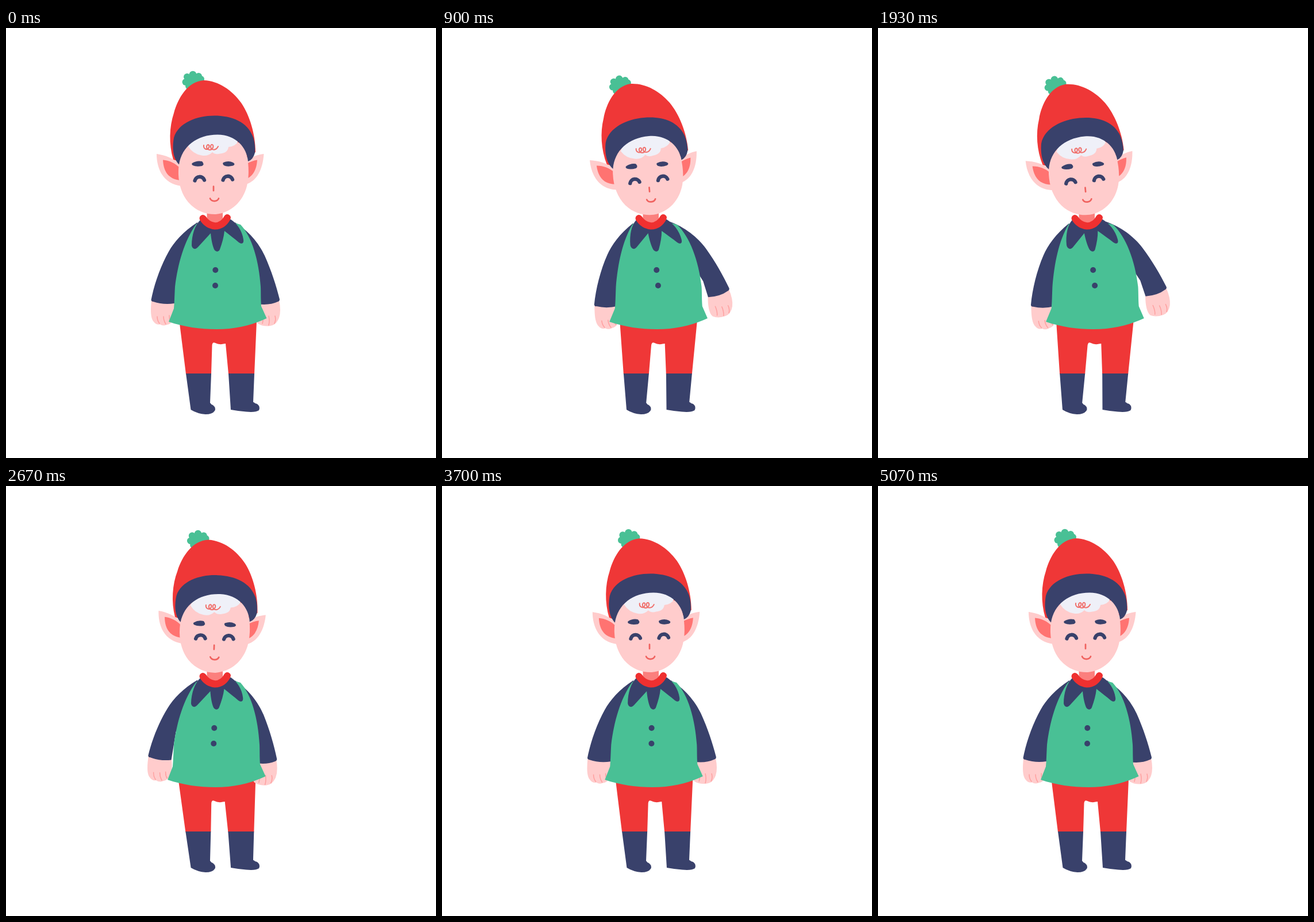
Recreate the animation shown at these times as an HTML page. Size 748 px wide and 748 px high, loop 5110 ms.

```html
<!DOCTYPE html>
<html lang="en">
<head>
<meta charset="utf-8">
<title>Dancing elf</title>
<style>
  html, body { margin: 0; width: 100%; height: 100%; overflow: hidden; background: #fff; }
  svg { display: block; width: 100%; height: 100%; }
  .red { fill: #ef3737; }
  .navy { fill: #39416b; }
  .green { fill: #49c095; }
  .skin { fill: #ffcccc; }
  .pink { fill: #ff7371; }
  .white { fill: #eff0f8; }
  .line { fill: none; stroke-linecap: round; stroke-linejoin: round; }
  .finger { stroke: #ff9f9f; stroke-width: 1.5; }
  .eye { stroke: #39416b; stroke-width: 6.3; }
  .mark { stroke: #f0625f; stroke-width: 2.7; }
  .curl { stroke: #f0706c; stroke-width: 2; }
  .ruff { stroke: #ef3030; stroke-width: 12; }
</style>
</head>
<body>
<svg viewBox="0 0 748 748">
  <g id="legs">
    <path class="red" d="M301.500 510L313 602H357L358.500 552Q359 546 363 547.500Q371 551.500 378 549.500L382 549L387 602H432L436 510Z"/>
    <path class="navy" d="M313 601H357L355 652Q357 655 360 656Q366 661 363 666Q359 672 347 672Q333 671 321.500 664Z"/>
    <path class="navy" d="M387 601H432L430 650.500Q433 653 437 654Q443 659 440 665Q434 669 418 667.500Q403 666 391 664Z"/>
  </g>

  <g id="armL">
    <path class="skin" d="M253 474C251.500 489 251 505 257 511Q261 517 268 515.500Q273 519 279 516.500Q288 515 291 507Q297 495 293 477Z"/>
    <path class="line finger" d="M263 502Q263 509 267 514M274 502Q274 509 278 515M284 500Q284 507 287 511"/>
    <path class="navy" d="M333 338C308 354 292 373 283 389C269 414 258 445 252.500 473Q253 476 256 476Q274 482 293 479L299 430L333 365Z"/>
  </g>

  <g id="armR">
    <path class="skin" d="M437 478L475 473Q479 492 475 504Q470 517 460 518Q447 520 438 514Q431 505 437 478Z"/>
    <path class="line finger" d="M446 498Q448 508 446 514M457 501Q459 509 457 517M468 501Q470 508 467 514"/>
    <path class="navy" d="M398 338C421 352 440 374 450 396C462 423 470 448 476 472Q476 475 473 476Q458 483 437 480L434 451L405 375Z"/>
  </g>

  <path class="green" id="tunic"/>
  <circle class="navy" id="buttonA" cy="421" r="5"/>
  <circle class="navy" id="buttonB" cy="448" r="5"/>
  <path fill="#fb7f7d" d="M349.500 318H377V338Q363 345 349.500 336Z"/>
  <path class="navy" id="collar"/>
  <path class="line ruff" d="M342.500 331Q350 343 363.500 344.500Q378 344 385 330"/>

  <g id="head">
    <g class="green">
      <circle cx="325" cy="93" r="13"/>
      <circle cx="315" cy="85" r="6"/>
      <circle cx="325" cy="81" r="6.300"/>
      <circle cx="335" cy="84" r="6"/>
      <circle cx="339" cy="89" r="6"/>
      <circle cx="312.500" cy="94" r="6"/>
      <circle cx="318" cy="101" r="6"/>
    </g>
    <path class="red" d="M291 229C283 202 284 172 292 148C299 122 316 93 344 91C370 92 393 108 409 130C424 152 434 185 434 216L420 225L300 232Z"/>
    <path class="skin" d="M304 239C292 226 276 221 262 219C262 244 273 272 306 275ZM417 233C426 223 440 220 448.500 219C447 243 438 266 417 272Z"/>
    <path class="pink" d="M304 245C295 235 283 230 273 229.500C274 248 281 263 304 265ZM417 237Q427 231 437 229.500C436 246 430 258 417 263Z"/>
    <path class="skin" d="M303 225C296 255 301 284 317 303C331 319 349 324.500 365 324C392 321 412 302 419 275C425 250 421 222 413 200L320 190Z"/>
    <g id="hair">
      <path class="white" d="M317 206Q330 176 362 174Q392 174 404 197Q399 206 387 207Q386 217 373 218.500Q364 221 359 216Q351 224 340 221.500Q325 219 317 206Z"/>
      <path class="line curl" d="M344 204C343 210 350 214 353 208C355 203 350 201 349 206C349 213 357 214 360 208C362 202 356 201 356 206C356 213 365 214 369 206"/>
    </g>
    <path class="navy" d="M301 237.500C290 226 289 208 292 191C300 164 333 152.500 362 152.500C393 152.500 420 163 430 190Q434 203 433 217Q430 229 421 232C419 208 400 185.500 368 185.500C332 185.500 306 206 301 237.500Z"/>
    <path class="navy" id="brows" d="M324 235Q332 230 341 232Q346 237 341 240Q331 242 325 239Q322 237 324 235ZM378 234Q387 230 395 234Q400 237 395 239.500Q385 242 379 239Q376 236 378 234Z"/>
    <path class="line eye" d="M328.500 265.500A8.600 8.600 0 0 1 345 264.500M377.500 264.500A8.600 8.600 0 0 1 394 263.500"/>
    <path class="line mark" d="M361 275.500V283M355 296.500A8 7 0 0 0 370 296.500"/>
  </g>
</svg>

<script>
  const LOOP = 5110, STEPS = 64, SWAY = 16, TICK = 1000 / 30;

  const rest  = { lean: 0, tilt: 0, left: 0, right: 0, squash: 0 };
  const swayL = { lean: -5.5, tilt: 4.6, left: 4.7, right: 4.2, squash: 0.013 };
  const swayR = { lean: 13.5, tilt: -5.5, left: -6, right: -13, squash: 0.013 };

  // When each pose is reached within one sway, in steps.
  const keys = [[0, rest], [2, swayL], [8.6, swayR], [10, swayR], [14.5, rest], [SWAY, rest]];

  const TUNIC = "M331 341C310 370 299 410 294 450C293 468 293 478 292 488L283 511C310 520 338 524 366 524C400 524 428 517 453.500 505L444 484C443 470 443.500 460 443 450C440 405 428 363 408 342L386 336L345 336Z";
  const COLLAR = "M338 334C329 342 323 360 323 378C324 385 330 386 334 381L356 357C357 368 359 378 362 385C365 390 370 390 372 385C376 374 379 363 380 353C389 360 398 367 405 373C411 377 414 374 413 368C411 353 402 340 391 333L364 340Z";

  const set = (id, name, value) => document.getElementById(id).setAttribute(name, value);
  const ease = u => (1 - Math.cos(Math.PI * u)) / 2;

  function poseAt(step) {
    const i = keys.findIndex(([at]) => at > step);
    const [[t0, a], [t1, b]] = [keys[i - 1], keys[i]];
    const w = ease((step - t0) / (t1 - t0));
    const pose = {};
    for (const k in a) pose[k] = a[k] + (b[k] - a[k]) * w;
    return pose;
  }

  // Sideways bend of the torso: none at the neck, strongest near the waist.
  const bend = (path, lean) => path.replace(/([\d.]+) ([\d.]+)/g, (_, x, y) => {
    const u = (475 - y) / 140;
    return (+x + lean * 0.74 * (1 - u * u)).toFixed(2) + " " + y;
  });

  function draw(step) {
    const { lean, tilt, left, right, squash } = poseAt(step);
    // The head nods while swinging from left to right.
    const nod = Math.max(0, Math.sin(Math.PI * step / 8)) ** 2;
    const s = squash + 0.025 * nod;
    const k = lean * 0.0045;

    set("tunic", "d", bend(TUNIC, lean));
    set("collar", "d", bend(COLLAR, lean));
    set("buttonA", "cx", 364.3 + lean * 0.75);
    set("buttonB", "cx", 364 + lean);
    set("legs", "transform", `matrix(1 0 ${-k} 1 ${k * 655} 0)`);
    set("armL", "transform", `rotate(${left} 350 345)`);
    set("armR", "transform", `rotate(${right} 392 345)`);
    set("head", "transform",
      `translate(${363 + lean * 0.3} ${325 + s * 80}) rotate(${tilt}) scale(1 ${1 - s}) translate(-363 -325)`);
    set("hair", "transform", `translate(0 ${s * 150})`);
    set("brows", "transform", `translate(0 ${nod * 15})`);
  }

  const start = performance.now();
  let shown = -1;

  function tick() {
    const t = (performance.now() - start) % LOOP;
    const time = Math.floor((t + 3.4) / TICK) * TICK;
    const step = Math.min(STEPS - 1, Math.floor(time * STEPS / LOOP)) % SWAY;
    if (step !== shown) draw(shown = step);
    requestAnimationFrame(tick);
  }
  tick();
</script>
</body>
</html>
```
